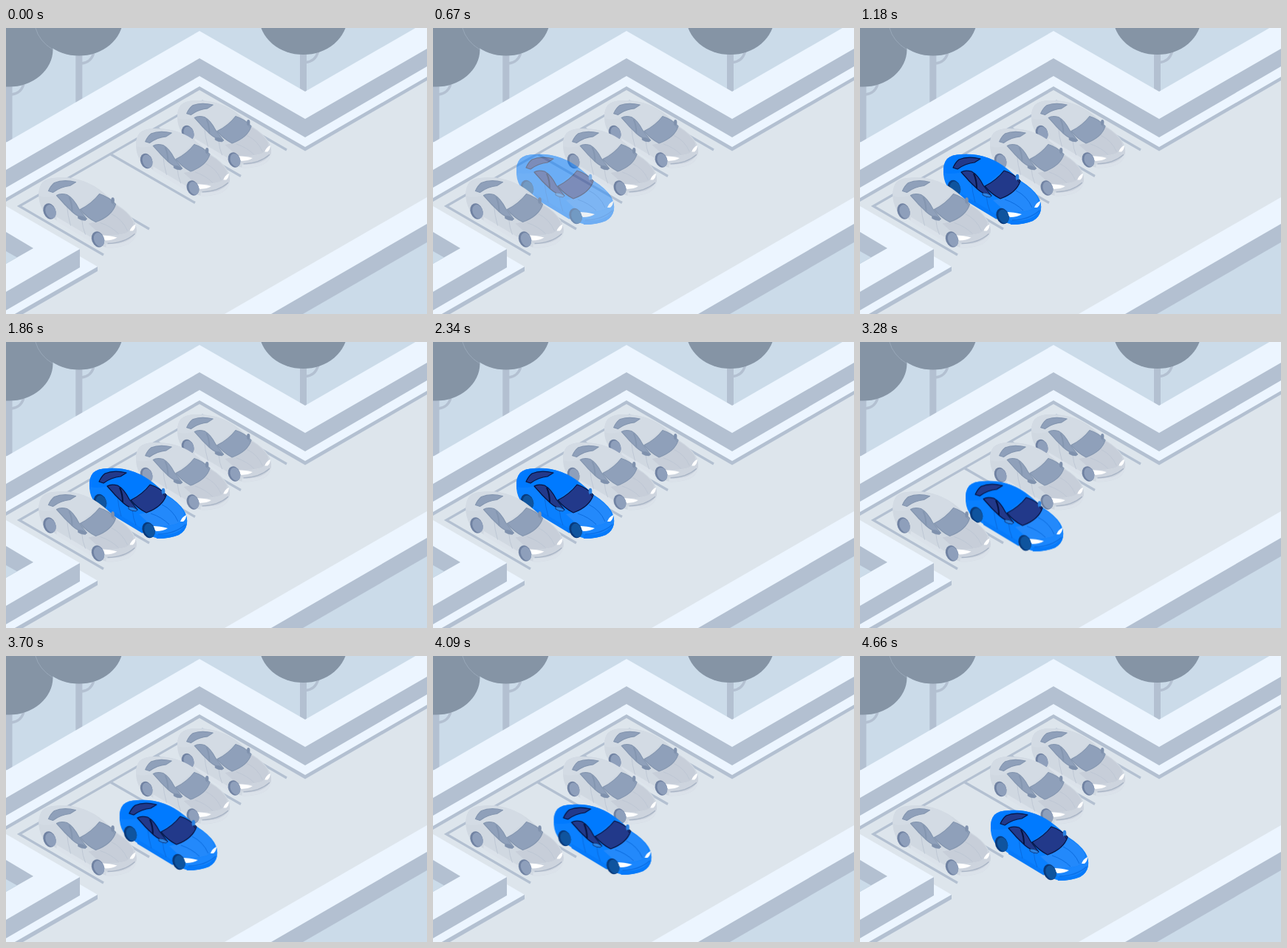
These frames come from a looping animation (570 px wide and 387 px high, 4.69 s). An HTML page:

```html
<!DOCTYPE html>
<html lang="en">
<head>
<meta charset="utf-8">
<title>Parking</title>
<style>
  html, body { margin: 0; width: 100%; height: 100%; overflow: hidden; background: #cbdbe9; }
  svg { display: block; width: 570px; height: 387px; }

  .top { fill: #ecf5ff; }
  .side { fill: #b3c0d1; }
  .ground { fill: #dde5ec; }
  .sky { fill: #cbdbe9; }
  .crown { fill: #8594a5; }
  .branch { fill: none; stroke: #b3c0d1; stroke-width: 3.4; }
  .lines { fill: none; stroke: #b3c0d1; stroke-width: 3.2; }

  .car {
    --roof: #d3dbe4; --flank: #d0d8e1; --hood: #c7ced9; --nose: #cdd4de;
    --glass: #8fa0ba; --frame: #8496b0; --tyre: #7082a2; --hub: #8e9fbb;
    --seam: #bcc6d3; --mirror: #7f91ad; --sill: #dbe2ea; --grille: #a9b5c6;
  }
  .active {
    --roof: #007aff; --flank: #0a80ff; --hood: #2389fb; --nose: #1a86fd;
    --glass: #22398a; --frame: #05123f; --tyre: #083a7c; --hub: #0f549e;
    --seam: #0969dc; --mirror: #2b82e2; --sill: #067afa; --grille: #0a6fe6;
    animation: appear 4690ms linear infinite, drive 4690ms linear infinite;
  }

  @keyframes appear {
    0%, 2.8% { opacity: 0; }
    25.16%, 100% { opacity: 1; }
  }
  /* parked until 2440 ms, then a brisk start and a steady roll */
  @keyframes drive {
    0%, 52.03% { transform: translate(0, 0); animation-timing-function: cubic-bezier(.33, .46, .67, .78); }
    61.62% { transform: translate(19.3px, 11.2px); }
    69.94% { transform: translate(30px, 17.3px); }
    81.45% { transform: translate(43.8px, 26px); }
    92.96% { transform: translate(57.2px, 34px); }
    100% { transform: translate(64.6px, 38.3px); }
  }
</style>
</head>
<body>
<svg viewBox="0 0 570 387">
  <defs>
    <g id="tree">
      <path class="side" d="M-4.500 30h9v95h-9z"/>
      <path class="branch" d="M3 61Q16 60 20 47"/>
      <ellipse class="crown" rx="59.500" ry="50.500"/>
    </g>

    <g id="car" stroke-linejoin="round">
      <!-- body -->
      <path fill="var(--flank)" d="M113 198Q112 184 118 177Q124 171 138 171Q158 170 174 176Q188 181 200 191Q211 200 218 207Q234 217 241 228Q246 236 245 246Q243 256 234 261Q222 266 206 266L190 261L137 229L121 218Q114 210 113 198Z"/>
      <path fill="var(--sill)" d="M137 224L184 252L185 259L137 230ZM204 261Q226 262 245 246Q243 256 234 261Q222 266 204 266Z"/>
      <path fill="var(--roof)" d="M113 196Q112 184 118 177Q124 171 138 171Q158 170 174 176Q187 181 197 190L168 214Q158 197 150 193Q142 191 134 196Q122 198 113 196Z"/>
      <path fill="var(--hood)" d="M190 231Q208 225 217 208Q235 218 241 231Q241 241 231 246Q217 250 197 249Q189 241 180 233Z"/>
      <path fill="var(--nose)" d="M197 249Q217 251 231 246Q241 241 242 231Q246 238 245 245Q238 257 222 260Q210 262 203 259Z"/>
      <path fill="none" stroke="var(--seam)" stroke-width=".9" d="M151 209Q152 222 156 236M171 226Q172 239 176 248M196 232Q211 237 221 247M211 220Q226 227 233 243"/>
      <path fill="none" stroke="var(--grille)" stroke-width="1.400" d="M206 260Q228 260 243 247"/>

      <!-- glass -->
      <g fill="var(--glass)" stroke="var(--frame)" stroke-width="1.200">
        <path d="M126 189Q129 182 134 178Q146 173 163 177L155 182Q143 183 132 191Z"/>
        <path d="M137 195Q142 192 151 194Q160 199 167 213L178 227Q167 225 159 218Q148 208 137 195Z"/>
        <path d="M169 214Q185 206 195 193Q208 197 217 207Q212 223 190 231Q178 225 169 214Z"/>
      </g>
      <path fill="none" stroke="var(--frame)" stroke-width="2" d="M154 197Q158 206 158 217"/>

      <!-- lamps and mirrors -->
      <path fill="#fff" d="M197 249Q209 249 219 252Q213 256 203 256ZM236 243Q238 237 244 234Q244 240 240 243Z"/>
      <path fill="var(--mirror)" stroke="var(--frame)" stroke-width=".6" d="M166 223Q172 222 178 227L176 229Q170 229 166 226Z"/>
      <ellipse fill="var(--mirror)" cx="213" cy="202" rx="2.300" ry="4.200"/>
      <path fill="none" stroke="var(--frame)" d="M213 205L215 209"/>

      <!-- wheels -->
      <g id="wheel">
        <ellipse fill="var(--tyre)" cx="127.500" cy="216.500" rx="8.300" ry="11" transform="rotate(-22 127.500 216.500)"/>
        <ellipse fill="var(--hub)" cx="129" cy="216.800" rx="6.800" ry="9.600" transform="rotate(-22 129 216.800)"/>
      </g>
      <use href="#wheel" x="65.500" y="38"/>
    </g>
  </defs>

  <path class="sky" d="M0 0H570V387H0Z"/>

  <!-- trees -->
  <use href="#tree" x="4" y="29"/>
  <use href="#tree" x="98.800" y="-13"/>
  <use href="#tree" x="402.500" y="-14.500"/>
  <path d="M40 0Q45 18 63 29" fill="none" stroke="#b3c0d1" stroke-width=".7" opacity=".6"/>

  <!-- back wall, stacked from its top edge down to the floor -->
  <path class="top" d="M0 155L262 4L405 86L570 -9V387H0Z"/>
  <path class="side" d="M0 192L262 41L405 123L570 28V387H0Z"/>
  <path class="top" d="M0 216L262 65L405 148L570 52V387H0Z"/>
  <path class="side" d="M0 230L262 79L405 161L570 66V387H0Z"/>
  <path class="ground" d="M0 235L262 84L405 166.500L570 71V387H0Z"/>

  <!-- front wall -->
  <path class="top" d="M570 229L296 387H570Z"/>
  <path class="side" d="M570 265L359 387H570Z"/>
  <path class="sky" d="M570 290L402 387H570Z"/>

  <!-- bays -->
  <path class="lines" d="M132 307L18 241L266 99L380 165M80 206L194 272M142 171L256 236.500M204 135L318 200.500"/>

  <!-- corner block -->
  <path class="top" d="M100 309L124 323L12 387H0V340Z"/>
  <path class="side" d="M124 323V329L23 387H12Z"/>
  <path class="side" d="M100 299V324L0 382V350Z"/>
  <path class="top" d="M0 241L100 299L0 357Z"/>
  <path class="side" d="M0 276L37 298L0 319Z"/>
  <path class="sky" d="M0 302L15 310.500L0 319Z"/>

  <!-- cars, far to near -->
  <use class="car" href="#car" transform="translate(123.700 -65.800) scale(.96)"/>
  <use class="car" href="#car" transform="translate(67.700 -27.800) scale(.96)"/>
  <use class="car active" href="#car"/>
  <use class="car" href="#car" transform="translate(-68.500 31.500)"/>
</svg>
</body>
</html>
```
